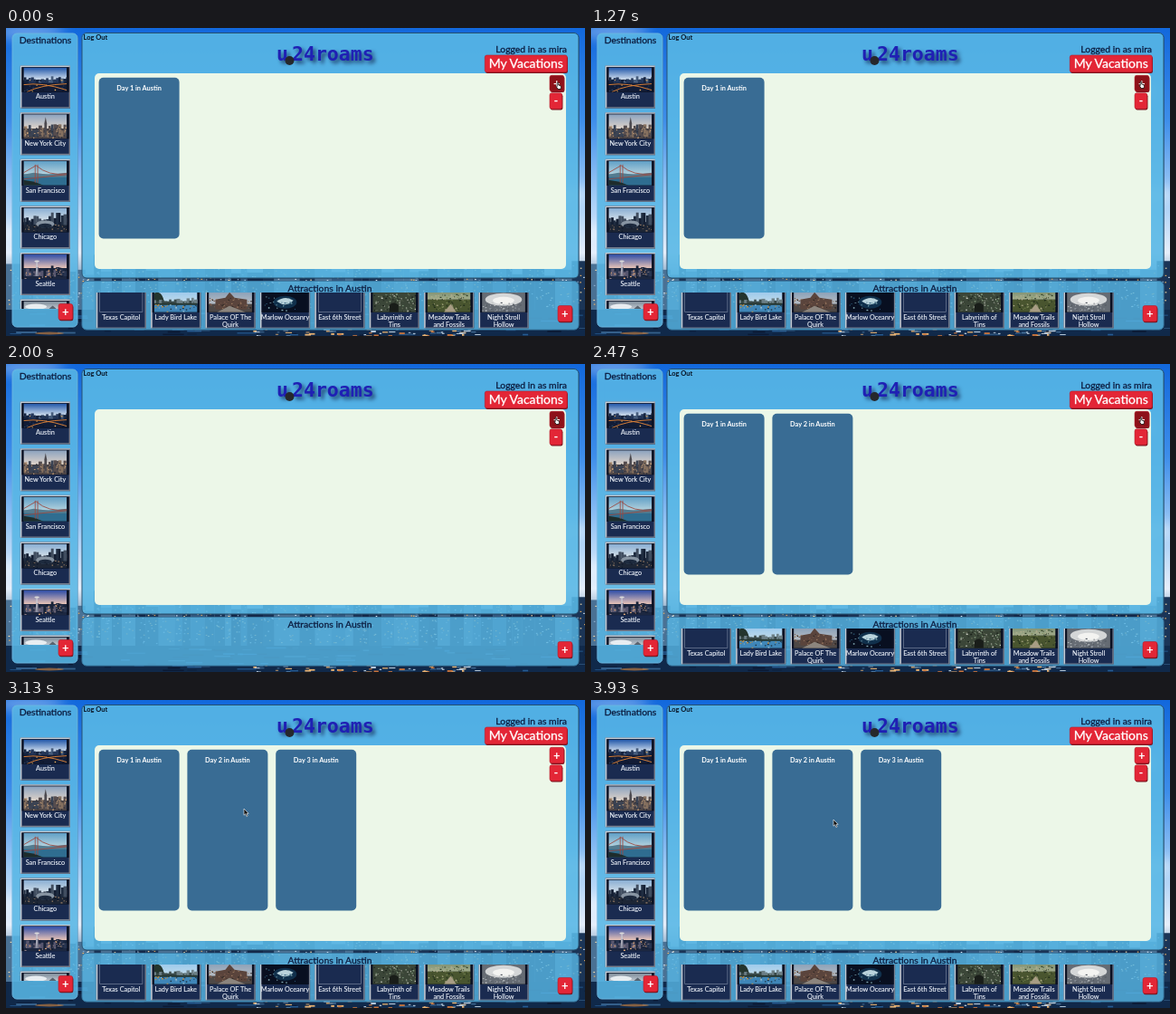
Animation of 640 by 340 pixels, one loop 3990 ms. Source, as an HTML page:

```html
<!DOCTYPE html>
<html lang="en">
<head>
<meta charset="utf-8">
<title>Trip planner</title>
<style>
html, body { margin: 0; width: 640px; height: 340px; overflow: hidden; }
svg { display: block; font-family: Lato, "Open Sans", sans-serif; }
text { text-anchor: middle; }
.label { font-size: 7.3px; fill: #eef3fa; stroke: #eef3fa; stroke-width: .12px; }
.head { font-size: 10.4px; fill: #0c1d40; stroke: #0c1d40; stroke-width: .3px; }
.day { font-size: 7.4px; font-weight: 700; fill: #fff; }
.log { font-size: 7.5px; font-weight: 700; fill: #061020; }
.btn { font-weight: 700; font-size: 13px; fill: #fff; }
.wide { font-size: 14px; fill: #fff; stroke: #fff; stroke-width: .3px; }
.end { text-anchor: end; }
.logo { font: 700 21.5px "DejaVu Sans Mono", monospace; fill: #1f20b4; text-anchor: start;
  filter: drop-shadow(3px 3px 2px rgba(10, 20, 60, .75)); }
</style>
</head>
<body>
<svg id="stage" width="640" height="340" viewBox="0 0 640 340">
  <defs>
    <linearGradient id="sky" x2="0" y2="1">
      <stop offset="0" stop-color="#1268dc"/>
      <stop offset=".3" stop-color="#3e8eea"/>
      <stop offset=".55" stop-color="#a3cdf6"/>
      <stop offset=".73" stop-color="#e6effb"/>
      <stop offset=".8" stop-color="#8fadc9"/>
      <stop offset="1" stop-color="#17406f"/>
    </linearGradient>
    <filter id="soft" x="-50%" y="-100%" width="200%" height="300%"><feGaussianBlur stdDeviation="7"/></filter>
    <clipPath id="destClip"><rect x="8" y="36" width="71" height="274"/></clipPath>
    <clipPath id="attrClip"><rect x="86" y="292" width="545" height="39.5"/></clipPath>
    <clipPath id="photoClip"><rect width="52" height="27"/></clipPath>
  </defs>
  <g id="scene"></g>
  <g id="panels"></g>
  <g id="dest" clip-path="url(#destClip)"></g>
  <g id="attr" clip-path="url(#attrClip)"></g>
  <g id="days"></g>
  <g id="ui"></g>
  <g id="cursor">
    <path id="arrow" d="M0 0V7.2L1.7 5.7L2.9 8.5L4.2 7.9L3 5.3H5.2Z" fill="#111" stroke="#fff" stroke-width=".6"/>
    <path id="hand" d="M.2 .4Q1-.5 1.7 .5V3L4.2 3.8Q4.8 5.6 4 7.5H1.2L-.8 4.8Q-.5 3.9 .2 4.6Z" fill="#fff" stroke="#111" stroke-width=".8"/>
  </g>
</svg>
<script>
const LOOP = 3990, STEP = 66.5;
const $ = id => document.getElementById(id);
const rect = (x, y, w, h, fill, more = "") =>
  `<rect x="${x}" y="${y}" width="${w}" height="${h}" fill="${fill}" ${more}/>`;
const path = (d, fill, more = "") => `<path d="${d}" fill="${fill}" ${more}/>`;
const line = (d, color, w) => path(d, "none", `stroke="${color}" stroke-width="${w}"`);
const oval = (x, y, rx, ry, fill, more = "") =>
  `<ellipse cx="${x}" cy="${y}" rx="${rx}" ry="${ry}" fill="${fill}" ${more}/>`;
const text = (x, y, cls, s) => `<text x="${x}" y="${y}" class="${cls}">${s}</text>`;

let seed = 7;
const rnd = (a = 0, b = 1) => {
  seed = (seed * 16807) % 2147483647;
  return a + (b - a) * seed / 2147483647;
};
const pick = list => list[Math.floor(rnd(0, list.length))];

function scene() {
  let s = rect(0, 0, 640, 340, "url(#sky)");
  for (let i = 0; i < 16; i++)
    s += oval(rnd(0, 640), rnd(60, 240), rnd(25, 75), rnd(5, 14), "#fff", 'opacity=".5" filter="url(#soft)"');
  s += oval(25, 4, 40, 6, "#fff", 'opacity=".5" filter="url(#soft)"');
  for (let x = 0; x < 640;) {
    const w = rnd(6, 19), y = rnd(249, 274);
    s += rect(x, y, w, 312 - y, pick(["#1b3557", "#34597f", "#14294a", "#4a7194"]));
    for (let i = 0; i < 14; i++)
      s += rect(x + rnd(1, w - 2), rnd(y + 3, 308), 1.6, 1.1, pick(["#ffe3ae", "#dceaf8", "#8fb2d0", "#f3b565"]));
    x += w;
  }
  s += rect(0, 311, 640, 29, "#10294a");
  for (let i = 0; i < 110; i++)
    s += rect(rnd(0, 640), rnd(312, 339), rnd(5, 24), rnd(.6, 2), pick(["#2c6aa5", "#0a1730", "#3f6f9c", "#0a1730"]), 'opacity=".8"');
  for (let i = 0; i < 60; i++)
    s += rect(rnd(260, 520), rnd(332, 340), rnd(2, 8), rnd(.8, 2), pick(["#e9b271", "#b9cbdc", "#c9743c", "#456f98"]));
  return s + oval(48, 337, 16, 1.5, "#b9783f", 'opacity=".7"');
}

function skyline(base, tones, low, high) {
  let s = "";
  for (let x = 0; x < 52; x += 3) {
    const h = rnd(low, high);
    s += rect(x, base - h, rnd(2.5, 4.5), h, pick(tones));
  }
  return s;
}
const specks = (n, y1, y2, tones) => Array.from({length: n},
  () => rect(rnd(0, 51), rnd(y1, y2), rnd(.7, 2.2), rnd(.6, 1.6), pick(tones))).join("");
// Sky fading from top to haze, above flat ground that starts at y
const land = (top, haze, ground, y) => {
  const id = "g" + top.slice(1);
  return `<linearGradient id="${id}" x2="0" y2="1"><stop stop-color="${top}"/><stop offset="1" stop-color="${haze}"/></linearGradient>` +
    rect(0, 0, 52, y, `url(#${id})`) + rect(0, y, 52, 27 - y, ground);
};

const photos = {
  austin: () => land("#1f55a8", "#dbe7f2", "#121c36", 14) +
    skyline(17, ["#14233f", "#24375a", "#465c7c"], 2, 8) + specks(30, 13, 26, ["#f5ba62", "#273c5b", "#0c1428"]) +
    line("M0 19Q22 16 52 25M4 27Q21 19 52 18", "#d98038", 1),
  york: () => land("#8ba2bf", "#dfd3c8", "#4c4444", 16) + skyline(25, ["#564d4e", "#85705f", "#3a4354"], 6, 14) +
    path("M25 25V10L26.5 3L28 10V25Z", "#4c4a50") + specks(60, 13, 26, ["#c49f78", "#2a2f3c"]),
  francisco: () => land("#5f9fc6", "#b5d3de", "#2f6d90", 15) + path("M0 15L12 13L30 15L52 13V18H0Z", "#547c90") +
    path("M0 27V21L13 23L24 27Z", "#1d2c2c") +
    line("M0 20L52 15M14 24V4M17 24V4M0 13L15 5Q30 17 52 14", "#9c4a40", .9),
  chicago: () => land("#86acd2", "#dde6ec", "#1d2636", 16) + skyline(19, ["#1f2c40", "#414e60", "#141f33"], 4, 14) +
    oval(26, 18, 11, 4, "#8794a2") + oval(26, 20, 8, 2.6, "#1d2a3e") + specks(35, 18, 26, ["#85705f", "#0f1828"]),
  seattle: () => land("#2f4da6", "#e8c3b6", "#1c2740", 15) +
    skyline(24, ["#28344f", "#57566e", "#182238"], 5, 12) + line("M15 24L16 7L17 24", "#c9cbd4", .8) +
    oval(16, 7.5, 3, .9, "#d9d8d8") + specks(50, 15, 26, ["#e0a878", "#10182c", "#8f7f86"]),
  cloud: () => land("#7d8b99", "#c3cbd3", "#e6eaed", 9) + oval(15, 6, 13, 3, "#e8edf1") + path("M27 11L35 5L43 11Z", "#59636e"),
  lake: () => land("#8ec2ec", "#c2dcea", "#3f86b8", 17) + path("M0 19V6Q9 2 12 15L52 15V19H0Z", "#24352e") +
    skyline(17, ["#3a4a4a", "#6c7f86"], 1, 6) + specks(30, 18, 26, ["#1f3444", "#9cc0d6", "#b08a4c"]),
  museum: () => land("#7c97b4", "#b7bdc4", "#4e4846", 18) + path("M8 24V13L20 11L25 5L31 11L46 13V24Z", "#5a443c") +
    specks(45, 11, 24, ["#2a2422", "#9b7b60", "#7c5c4c"]) + path("M10 27L25 20L44 27Z", "#8c857e"),
  oceanary: () => rect(0, 0, 52, 27, "#080f20") + oval(26, 16, 14, 7, "#10304c") +
    path("M16 15Q26 8 36 14Q30 20 22 18Z", "#b9d3dc") + specks(22, 9, 25, ["#2b5a78", "#85adb5"]),
  tins: () => rect(0, 0, 52, 27, "#3b4638") + specks(110, 6, 26, ["#c8cabf", "#1b221b", "#5b6450", "#7f957a"]) +
    path("M20 27V19Q26 14 31 19V27Z", "#191d19"),
  meadow: () => land("#6f8468", "#a3ad8c", "#49552f", 13) + specks(100, 6, 24, ["#222f1c", "#7c8a58", "#b9b393", "#38442a"]) +
    path("M20 27L28 18L35 27Z", "#a89d84"),
  night: () => rect(0, 0, 52, 27, "#666c74") + oval(26, 13, 22, 7, "#d4d6d7") +
    oval(26, 14, 13, 4, "#f3f3f1") + specks(50, 16, 26, ["#9aa1a8", "#4b525a", "#c4c6c6"])
};

function card(x, y, photo, lines) {
  const w = 55.2, h = 47;
  let s = rect(x, y, w, h, "#1a2b50") +
    line(`M${x + .8} ${y + h}V${y + .8}H${x + w}`, "#c3cbd4", 1.6) +
    line(`M${x + w - .7} ${y + 1}V${y + h - .7}H${x + 1}`, "#777f8d", 1.4);
  s += photo ? rect(x + 1.6, y + 1.6, w - 3, 27.6, "#0b1122") +
      `<g transform="translate(${x + 3.6} ${y + 2}) scale(.92 1)" clip-path="url(#photoClip)">${photos[photo]()}</g>`
    : rect(x + 4, y + 3, w - 8, 25.5, "none", 'stroke="#8390a7" stroke-width=".6"');
  lines.forEach((t, i) => s += text(x + w / 2, y + 36.8 + i * 8, "label", t));
  return s;
}

const panel = (x, y, w, h, alpha, edge) => rect(x + 1, y + 1, w, h, "#173b59", 'rx="5" opacity=".3"') +
  rect(x, y, w, h, "#5cbfee", `rx="5" fill-opacity="${alpha}" stroke="${edge}" stroke-width="1"`);

const button = (x, y, w, h, label, id = "") => rect(x + .7, y + 1.2, w, h, "#74121c", 'rx="2.2"') +
  rect(x, y, w, h, "#e32636", `rx="2.2" stroke="#b51c2a" stroke-width=".6" id="${id}"`) +
  text(x + w / 2, y + h / 2 + 4.5, "btn", label);

$("scene").innerHTML = scene();
$("panels").innerHTML = panel(7, 6, 72, 324, .82, "#68b2dc") + panel(84, 5.5, 549, 270.5, .84, "#26506e") +
  panel(84, 279.5, 549, 53.5, .76, "#3a7ba3") + rect(98, 50, 521, 216, "#ecf7e8", 'rx="5"');

const cities = [["austin", "Austin"], ["york", "New York City"], ["francisco", "San Francisco"],
  ["chicago", "Chicago"], ["seattle", "Seattle"], ["cloud", ""]];
$("dest").innerHTML = cities.map(([p, t], i) => card(15.8, 41.6 + i * 51.6, p, [t])).join("");

const sights = [["", "Texas Capitol"], ["lake", "Lady Bird Lake"], ["museum", "Palace OF The", "Quirk"],
  ["oceanary", "Marlow Oceanry"], ["", "East 6th Street"], ["tins", "Labyrinth of", "Tins"],
  ["meadow", "Meadow Trails", "and Fossils"], ["night", "Night Stroll", "Hollow"]];
$("attr").innerHTML = sights.map(([p, ...t], i) => card(99.7 + i * 60.4, 284.8, p, t)).join("");

$("days").innerHTML = [1, 2, 3].map((n, i) => {
  const x = 102.6 + i * 97.8;
  return `<g>${rect(x, 54.7, 89, 177.8, "#396c94", 'rx="5"')}${text(x + 44.5, 68.6, "day", `Day ${n} in Austin`)}</g>`;
}).join("");

$("ui").innerHTML = text(43.5, 17, "head", "Destinations") + text(358, 291, "head", "Attractions in Austin") +
  text(99, 13, "log", "Log Out") + text(620, 27, "head end", "Logged in as mira") +
  text(299, 36, "logo", "u") + text(316, 36, "logo", "24roams") + oval(313.5, 36, 5, 5, "#26282c") +
  button(529.3, 30, 91, 18.8, "") + text(574.8, 44.3, "wide", "My Vacations") +
  button(601, 52.3, 15.7, 17.5, "+", "plus") + button(601, 71.8, 13.7, 17.5, "-") +
  button(58, 304.5, 15.7, 17.5, "+") + button(610, 306.5, 15.7, 17.5, "+");

// Pointer path: time, x, y
const route = [[0, 609, 60], [130, 609, 60], [560, 566.5, 80], [800, 566.5, 80], [1130, 607, 59],
  [2730, 607, 59], [3100, 263, 120], [3330, 263, 120], [3800, 268, 132], [LOOP, 268, 132]];
// Number of days on the board; zero while it reloads
const board = [[0, 1], [1930, 0], [2130, 2], [2530, 0], [2730, 3]];

function pointer(t) {
  const i = route.findIndex(p => p[0] > t);
  const [a, b] = [route[i - 1], route[i]];
  const u = (t - a[0]) / (b[0] - a[0]), e = u * u * (3 - 2 * u);
  return [a[1] + (b[1] - a[1]) * e, a[2] + (b[2] - a[2]) * e];
}

function draw(now) {
  const t = Math.min(59, Math.floor((now % LOOP + 5) / STEP)) * STEP + 3;
  const [x, y] = pointer(t);
  const over = x > 601 && y > 52 && y < 70;
  const count = board.filter(b => b[0] <= t).pop()[1];
  [...$("days").children].forEach((d, i) => d.style.display = i < count ? "" : "none");
  $("attr").style.display = count ? "" : "none";
  $("plus").setAttribute("fill", over ? "#8d1119" : "#e32636");
  $("cursor").setAttribute("transform", `translate(${x} ${y})`);
  $("arrow").style.display = over ? "none" : "";
  $("hand").style.display = over ? "" : "none";
}

const start = performance.now();
function tick() {
  draw(performance.now() - start);
  requestAnimationFrame(tick);
}
tick();
</script>
</body>
</html>
```
